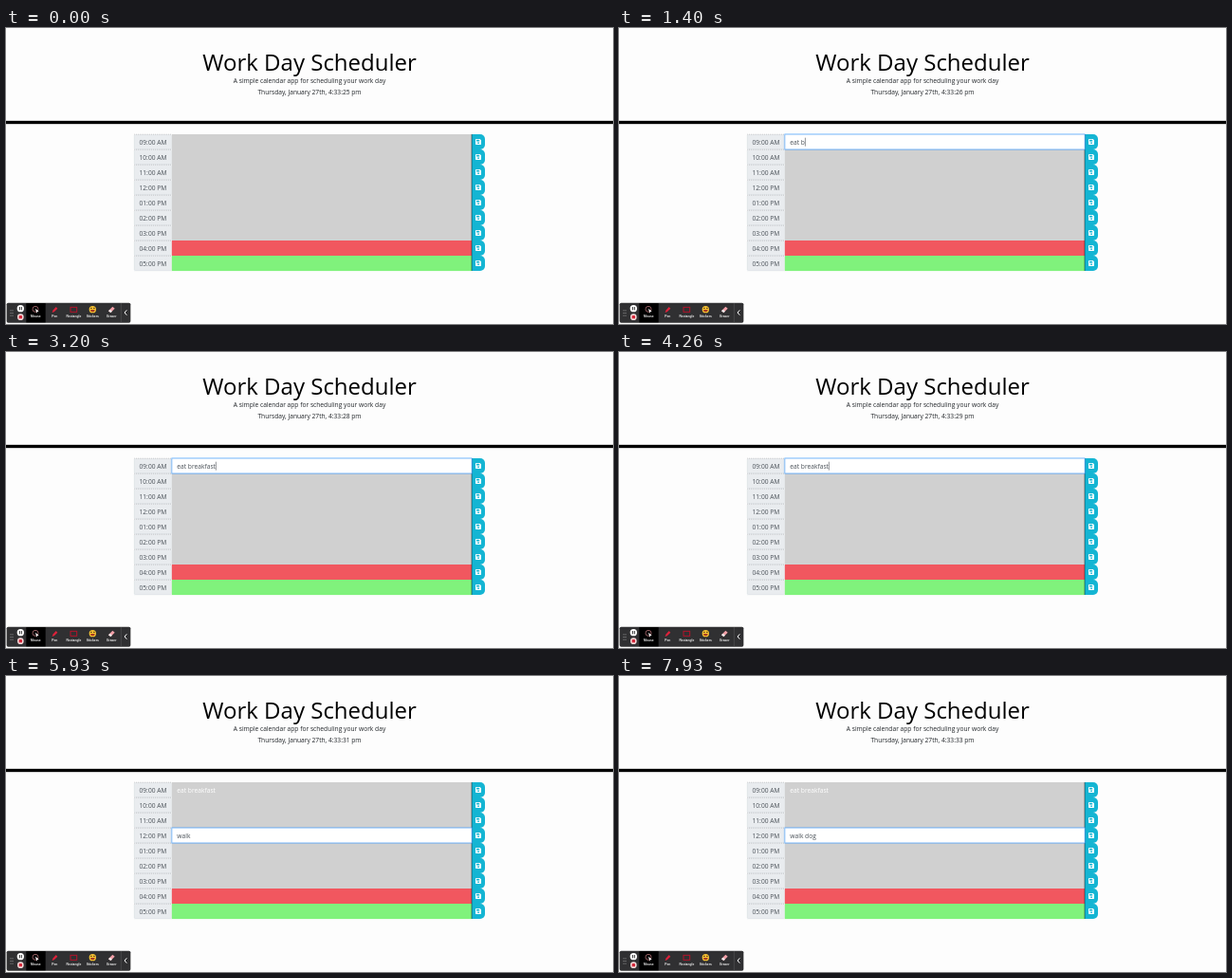
An HTML page that plays this animation: 640 px wide and 312 px high, repeating every 8 s.

```html
<!DOCTYPE html>
<html lang="en">
<head>
<meta charset="utf-8">
<title>Work Day Scheduler</title>
<style>
  html, body { margin: 0; width: 100%; height: 100%; overflow: hidden; background: #fdfdfd; }
  svg { display: block; width: 100%; height: 100%; }
  text { font: 20px "Open Sans", "Noto Sans", sans-serif; fill: #212529; white-space: pre; }
  .middle { text-anchor: middle; }
  .title { font-size: 72px; fill: #000; }
  .hour { fill: #495057; }
  .tool { font: bold 10px "Liberation Sans", Arial, sans-serif; fill: #eee; text-anchor: middle; }
</style>
</head>
<body>
<svg viewBox="0 0 1920 936" preserveAspectRatio="none">
  <text class="title middle" x="960" y="135">Work Day Scheduler</text>
  <text class="middle" x="960" y="175">A simple calendar app for scheduling your work day</text>
  <text class="middle" x="960" y="211" id="clock"></text>
  <rect y="293.5" width="1920" height="10"/>
  <g id="rows"></g>
  <g id="focus">
    <rect x="523" y="-1.5" width="952" height="51" rx="3" fill="none" stroke="#007bff" stroke-opacity=".25" stroke-width="3.2"/>
    <rect x="525" y=".5" width="948" height="47" fill="#fff" stroke="#80bdff" stroke-width="2"/>
    <text class="hour" x="541" y="31.8" id="typed"></text>
    <rect id="caret" y="11" width="1.6" height="27" fill="#343a40"/>
  </g>
  <g id="toolbar"></g>
</svg>
<script>
const LOOP = 8000, BLINK = 500, ROW = 48, TOP = 336;
const $ = id => document.getElementById(id);
const rowY = row => TOP + row * ROW;

// Each entry: row, focus time, text, key times
const entries = [
  { row: 0, start: 150, text: "eat breakfast",
    keys: [800, 930, 1060, 1200, 1330, 1460, 1600, 1800, 1900, 2860, 3000, 3100, 3200] },
  { row: 3, start: 4530, text: "walk dog",
    keys: [4800, 4930, 5060, 5130, 5430, 6160, 6800, 7100] },
];

const hours = ["09:00 AM", "10:00 AM", "11:00 AM", "12:00 PM", "01:00 PM",
               "02:00 PM", "03:00 PM", "04:00 PM", "05:00 PM"];
const slotColor = i => i < 7 ? "#d0d0d0" : i === 7 ? "#f1575f" : "#80f27c";

$("rows").innerHTML = hours.map((hour, i) => `
  <g transform="translate(0 ${rowY(i)})">
    <rect x="405" width="120" height="48" rx="5" fill="#e9ecef"/>
    <path d="M405 .5H525" stroke="#777" stroke-dasharray="3 3"/>
    <path d="M405.5 3V45M405 47.5H525" stroke="#ced4da"/>
    <text class="hour" x="421.5" y="31.8">${hour}</text>
    <rect x="524.5" width="949" height="48.3" fill="${slotColor(i)}"/>
    <text x="541" y="31.8" style="fill:#fff" id="saved${i}"></text>
    <path d="M1473 0H1500a15 15 0 0 1 15 15V33a15 15 0 0 1-15 15H1473Z" fill="#14b5d3"/>
    <path d="M1473 0V48" stroke="#111" stroke-width="1.5"/>
    <path d="M1487 15h12l4 4v12a2 2 0 0 1-2 2h-14a2 2 0 0 1-2-2v-14a2 2 0 0 1 2-2Z" fill="#fff"/>
    <path d="M1488 17.500h9.500v5h-9.500Z" fill="#14b5d3"/>
    <circle cx="1494.200" cy="27.500" r="2.600" fill="#14b5d3"/>
  </g>`).join("");

const tools = [
  ["Mouse", `<circle cx="-1" cy="-1" r="9" fill="none" stroke="#d98a8e" stroke-width="2"/>
             <path d="M-1-3L10 6L5 7L3 12Z" fill="#fff"/>`],
  ["Pen", `<path d="M-8 10L-6 3L4-8L9-3L-1 7Z" fill="#e0213a"/>`],
  ["Rectangle", `<rect x="-10" y="-7" width="20" height="15" fill="none" stroke="#b3132b" stroke-width="3"/>`],
  ["Stickers", `<circle r="11" fill="#f7c331"/><path d="M-7 1H7A7 7 0 0 1-7 1Z" fill="#a83a22"/>
                <path d="M-7-4h5M2-4h5" stroke="#51351a" stroke-width="3"/>`],
  ["Eraser", `<path d="M-10 5L3-9L10-3L-3 10Z" fill="#f3a0a8"/><path d="M-10 5L-5 0L2 6L-3 10Z" fill="#eee"/>`],
];

$("toolbar").innerHTML = `
  <rect x="2" y="869" width="392" height="63" rx="5" fill="#303032"/>
  <rect x="64" y="870" width="61" height="61" fill="#000"/>
  <path d="M364 870V931" stroke="#555" stroke-width="2"/>
  <path d="M15 892V912M21 892V912" stroke="#999" stroke-width="3" stroke-dasharray="3 5"/>
  <circle cx="46" cy="887" r="11" fill="#fff"/>
  <path d="M43 882V892M49 882V892" stroke="#333" stroke-width="3"/>
  <circle cx="46" cy="914" r="10" fill="#f4d8d8"/>
  <rect x="41" y="909" width="10" height="10" rx="2" fill="#d5283b"/>
  <path d="M382 892L375 900L382 908" fill="none" stroke="#fff" stroke-width="3"/>` +
  tools.map(([name, icon], i) => `
    <g transform="translate(${94 + i * 60} 890)">${icon}<text class="tool" y="25">${name}</text></g>`).join("");

function draw(now) {
  const t = now % LOOP;
  $("clock").textContent = `Thursday, January 27th, 4:33:${25 + Math.floor((t + 70) / 1000)} pm`;

  const active = entries.findLast(entry => t >= entry.start);
  for (const entry of entries) {
    const saved = entry !== active && t > entry.start;
    $("saved" + entry.row).textContent = saved ? entry.text : "";
  }

  $("focus").style.display = active ? "" : "none";
  if (active) {
    const pressed = active.keys.filter(key => t >= key);
    const lastEvent = pressed.at(-1) ?? active.start;
    $("focus").setAttribute("transform", `translate(0 ${rowY(active.row)})`);
    $("typed").textContent = active.text.slice(0, pressed.length);
    $("caret").setAttribute("x", 541 + $("typed").getComputedTextLength());
    $("caret").style.display = Math.floor((t - lastEvent) / BLINK) % 2 ? "none" : "";
  }
}

const origin = performance.now();
function tick() {
  draw(performance.now() - origin);
  requestAnimationFrame(tick);
}
tick();
</script>
</body>
</html>
```
